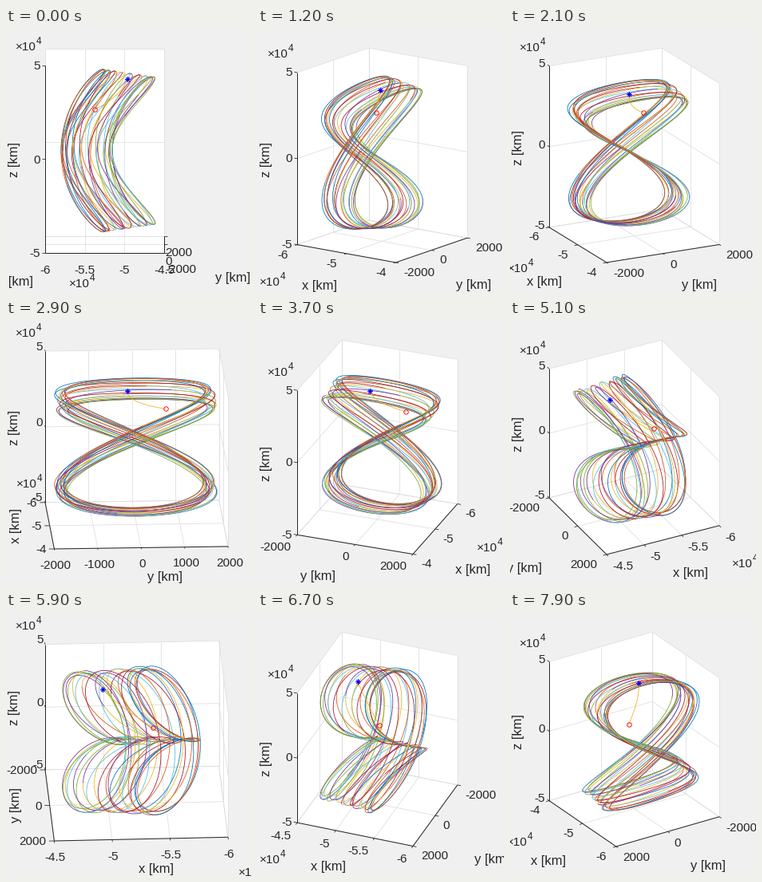
Write a matplotlib script that moves like this. It is 308x331 px and loops after 8000 ms.

```python
import numpy as np
import matplotlib.pyplot as plt
from matplotlib.animation import FuncAnimation
from matplotlib.collections import LineCollection

W, H, DPI = 308, 331, 64
FRAMES, STEP_MS = 80, 100
PT = 72 / DPI
INK, GRID, BACK = "#262626", "#dedede", "#f0f0f0"
CYCLE = ["#0072bd", "#d95319", "#edb120", "#7e2f8e",
         "#77ac30", "#4dbeee", "#a2142f"]
RING = [(-1, -1), (1, -1), (1, 1), (-1, 1)]
START, END = (-5.376, 703, 2.04), (-4.963, -217, 3.88)


plt.rcParams["font.family"] = "Liberation Sans"
fig = plt.figure(figsize=(W / DPI, H / DPI), dpi=DPI, facecolor=BACK)
ax = fig.add_axes([0, 0, 1, 1])


def orbit(revs=20, drift=4.2):
    """Figure-eight orbit whose centre slowly drifts along x."""
    th = np.linspace(0, 2 * np.pi * revs, revs * 90)
    u = 0.5 - 0.5 * np.cos(th * drift / revs + 0.4)
    size = 1720 + 130 * np.cos(th * 0.29 + 1)
    x = -5.8 + 0.65 * u + 0.54 * np.sin(th) ** 2
    y = size * np.sin(2 * th)
    z = (4.28 - 0.42 * u) * np.sin(th)
    return np.array([x, y, z])


def lead_in():
    """Short arc from the start marker to the end marker."""
    p, m, q = map(np.array, (START, (-5.1, 20, 2.97), END))
    t = np.linspace(0, 1, 30)[:, None]
    ctrl = 2 * m - (p + q) / 2
    return ((1 - t) ** 2 * p + 2 * t * (1 - t) * ctrl + t ** 2 * q).T


ORBIT = orbit()
LEAD = lead_in()
PIECE = 57


class View:
    def __init__(self, n):
        az = 3 * n
        el = 5 + n * 5 / 12 if n <= 60 else 30 - 0.45 * (n - 60)
        self.quad, self.turn = divmod(az, 90)
        c, s = np.cos(np.radians(az)), np.sin(np.radians(az))
        span = abs(c) + abs(s)
        tilt = np.tan(np.radians(el))
        # margins depend on which axis is seen end-on
        after = max(0, 1 - self.turn / 26)
        before = np.clip(1 - (87 - self.turn) / 20, 0, 1)
        width = 213 - 64 * after + 16 * before
        top = 25 + after + 11 * before
        bottom = 294 - 12.5 * after ** 2 - 7 * before
        self.c, self.s = c, s
        self.sx = width / span
        self.h = (bottom - top) / (1 + tilt * span)
        self.v = self.h * tilt
        self.cx, self.cy = 49 + width / 2, (top + bottom) / 2
        wide = np.hypot(self.sx * c, self.v * s) > 137
        self.xhi = -4.5 if wide else -4.0
        self.xt = np.arange(-6, self.xhi + 0.1, 0.5 if wide else 1)
        ylen = np.hypot(self.sx * s, self.v * c)
        self.yt = np.arange(-2000, 2001, 1000 if ylen > 170 else 2000)

    def box(self, x, y, z):
        """Project box coordinates (-1..1) to the stage."""
        x, y, z = x / 2, y / 2, z / 2
        px = self.cx + self.sx * (x * self.c + y * self.s)
        py = self.cy - self.h * z - self.v * (y * self.c - x * self.s)
        return np.array([px, py])

    def norm_x(self, x):
        return 2 * (x + 6) / (self.xhi + 6) - 1

    def data(self, x, y, z):
        return self.box(self.norm_x(x), y / 2000, z / 5)


def line(p, q, color, lw=0.8):
    ax.plot([p[0], q[0]], [p[1], q[1]], color=color, lw=lw * PT,
            solid_capstyle="butt")


def text(x, y, s, size=15.3, ha="center", rot=0):
    ax.text(x, y, s, fontsize=size * PT, color=INK, ha=ha, rotation=rot,
            va="center" if rot else "center_baseline")


def exponent(x, y):
    text(x + 10, y + 1, "×10", ha="right")
    text(x + 10, y - 6, "4", 12, ha="left")


def draw_box(v, corners):
    left, front, right, back = corners
    floor = [v.box(*p, -1) for p in corners]
    wall_a = [v.box(*left, -1), v.box(*left, 1), v.box(*back, 1), v.box(*back, -1)]
    wall_b = [v.box(*back, -1), v.box(*back, 1), v.box(*right, 1), v.box(*right, -1)]
    for poly in (floor, wall_a, wall_b):
        ax.fill(*np.array(poly).T, color="white", lw=0.3)
    bx, by = back
    for x in v.norm_x(v.xt):
        line(v.box(x, -1, -1), v.box(x, 1, -1), GRID)
        line(v.box(x, by, -1), v.box(x, by, 1), GRID)
    for y in v.yt / 2000:
        line(v.box(-1, y, -1), v.box(1, y, -1), GRID)
        line(v.box(bx, y, -1), v.box(bx, y, 1), GRID)
    for z in (-1, 0, 1):
        line(v.box(-1, by, z), v.box(1, by, z), GRID)
        line(v.box(bx, -1, z), v.box(bx, 1, z), GRID)


def unit(p):
    return p / np.hypot(*p)


def draw_z(v, left, front):
    lo, hi = v.box(*left, -1), v.box(*left, 1)
    out = lo - v.box(*front, -1)
    u = unit(out)
    line(lo, hi, INK, 1)
    for z in (-5, 0, 5):
        p = v.box(*left, z / 5)
        line(p, p + 0.03 * out, INK)
        text(p[0] - 2 - 4 * abs(u[0]), p[1] + 7 * u[1], str(z), ha="right")
    text(11, (lo[1] + hi[1]) / 2 + 1, "z [km]", 16.5, rot=90)
    exponent(28, hi[1] - 25)


def draw_floor_axis(v, name, a, b, out, side, other_end_on):
    """side is -1 for the left lower edge, 1 for the right one."""
    p, q = v.box(*a, -1), v.box(*b, -1)
    line(p, q, INK, 1)
    d = unit(q - p)
    end_on = abs(d[0]) < 0.35
    t = unit(out)
    for val in v.xt if name == "x" else v.yt:
        if name == "x":
            k = v.box(v.norm_x(val), a[1], -1)
        else:
            k = v.box(a[0], val / 2000, -1)
        line(k, k + 0.03 * out, INK)
        if end_on:
            dx, dy = (1, 20) if side > 0 else (-10, 0)
        else:
            dx, dy = (11 - side) * t[0], 21 - 10 * abs(t[0])
        ha = "center" if abs(t[0]) < 0.3 else "right" if side < 0 else "left"
        text(k[0] + dx, k[1] + dy, f"{val:g}", ha=ha)

    label, mid = f"{name} [km]", (p + q) / 2
    lean = abs(d[1])
    outer = p if side < 0 else q
    flat_x = name == "x" and side < 0 and v.turn == 0
    if end_on and side < 0:
        text(13, mid[1], label, 16.5, rot=90)
    else:
        if name == "x":
            dx, dy = 29 + 24 * lean, 36 + 18 * lean
        else:
            dx, dy = 40 + 38 * lean, 35 + 23 * lean
        if end_on:
            dx, dy = 86, 41
        elif flat_x:
            dx = 111
        elif other_end_on and side > 0:
            dx -= 11
        text(mid[0] + side * dx, mid[1] + dy, label, 16.5)
    if name == "x":
        if end_on and side < 0:
            dx, dy = -20, -25
        elif flat_x:
            dx, dy = 46, 37
        else:
            dx = side * (28 + 16 * lean)
            dy = 42 + 14 * lean
        exponent(outer[0] + dx, outer[1] + dy)


def draw_orbit(v):
    pts = v.data(*ORBIT).T
    cuts = range(0, len(pts) - 1, PIECE)
    segs = [pts[i:i + PIECE + 1] for i in cuts]
    cols = [CYCLE[i % len(CYCLE)] for i in range(len(segs))]
    ax.add_collection(LineCollection(segs, colors=cols, linewidths=0.8 * PT,
                                     zorder=3))
    ax.plot(*v.data(*LEAD), color=CYCLE[2], lw=0.8 * PT, zorder=3)
    ax.plot(*v.data(*START), "o", mec="red", mfc="none", ms=5.5 * PT,
            mew=0.9 * PT, zorder=4)
    ax.plot(*v.data(*END), marker=(8, 2, 0), mec="blue", ms=6.3 * PT,
            mew=0.8 * PT, zorder=4)


def draw(n):
    ax.clear()
    ax.set_xlim(0, W)
    ax.set_ylim(H, 0)
    ax.axis("off")
    v = View(n)
    corners = [RING[(v.quad + i) % 4] for i in range(4)]
    left, front, right, _ = corners
    draw_box(v, corners)
    pl, pf, pr = (v.box(*p, -1) for p in (left, front, right))
    names = "xy" if v.quad % 2 == 0 else "yx"
    left_end_on = abs(unit(pf - pl)[0]) < 0.35
    draw_floor_axis(v, names[0], left, front, pf - pr, -1, False)
    draw_floor_axis(v, names[1], front, right, pf - pl, 1, left_end_on)
    draw_z(v, left, front)
    draw_orbit(v)
    return []


anim = FuncAnimation(fig, draw, frames=FRAMES, interval=STEP_MS,
                     init_func=lambda: [], repeat=True, repeat_delay=0,
                     cache_frame_data=False)
plt.show()
```
